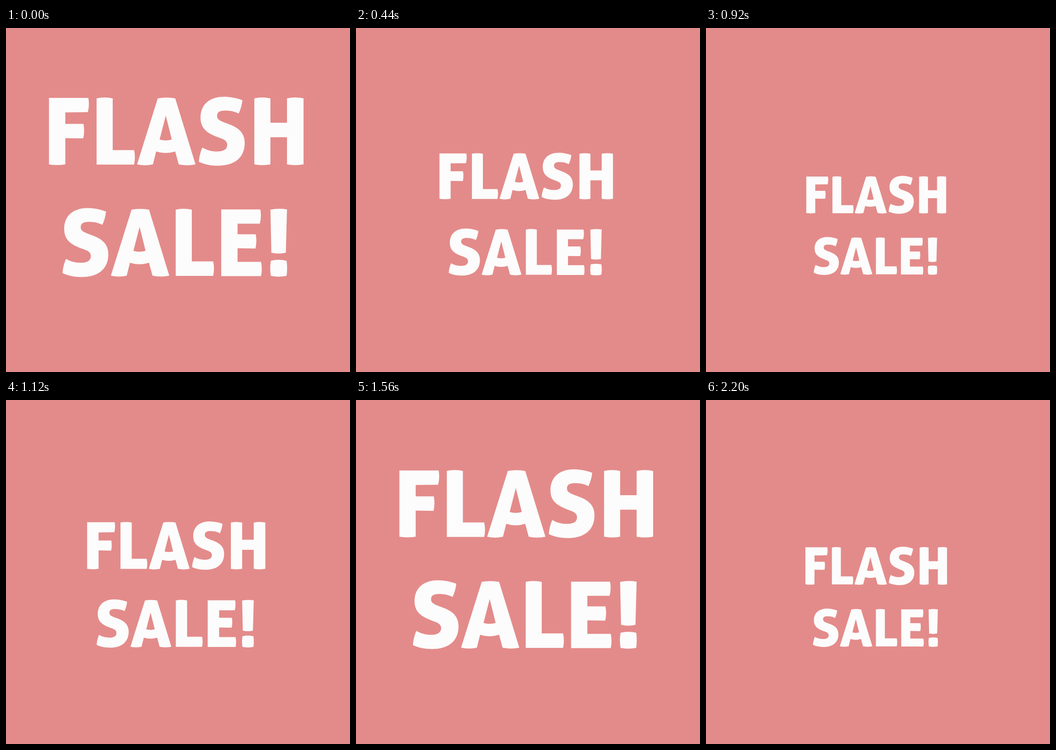
An HTML page that plays this animation: 748x748 px, repeating every 2.24 s.

```html
<!DOCTYPE html>
<html lang="en">
<head>
<meta charset="utf-8">
<title>Flash sale</title>
<style>
html, body { margin: 0; width: 100%; height: 100%; overflow: hidden; background: #e38b8a; }
svg { display: block; width: 100%; height: 100%; fill: #fcfcfc; fill-rule: evenodd; }
</style>
</head>
<body>
<svg viewBox="0 0 748 748" role="img" aria-label="FLASH SALE!">
  <defs>
    <path id="L" d="M197 153Q205 151 214 151T232 153V265.5H278.5Q282 281 278.5 297H197Z"/>
    <path id="A" d="M330 153Q349 149.5 368 153L412 296.5Q394 300.5 375.5 296.5L368 268.5Q347 275 326.5 268.5L319.500 296.500Q302 300.500 285 296.500ZM347.500 190.500L334 242.500Q347 246.500 360.500 242.500Z"/>
    <path id="S" d="M514 157C502 152.500 488 149.500 474 149.500C442 149.500 423 167 423 195C423 219 438 229 461 237.500C474 242 481 245 481 254C481 264 473 268.500 459 268.500C448 268.500 437 266 427 260C423 269 420 280 419.500 291C432 297 446 299.500 461 299.500C498 299.500 519 281 519 250C519 230 508 218 487 210C469 203 459 201 459 191C459 183 465 179.500 476 179.500C487 179.500 497 181.500 506 186C510 177 513 168 514 157Z"/>
  </defs>
  <g id="words">
    <path d="M93.500 152H179Q182 167 178 183L129 183.500V208.500H168.500Q171.500 224 168 240L129 239.500V296.500Q111 299.500 93.500 296.500Z"/>
    <use href="#L"/>
    <use href="#A"/>
    <use href="#S"/>
    <path d="M540 153Q557 149 575 153V206H611V153Q629 149 647 153V296.500Q629 300 611 296.500V237.500H575V296.500Q557 300 540 296.500Z"/>
    <use href="#S" x="-296.500" y="242"/>
    <use href="#A" x="-57" y="242"/>
    <use href="#L" x="172" y="242"/>
    <path d="M468 394.500H553Q556 410 552 425.500H503.500V448.500H543Q546 464 542.500 479.500L503.500 479V508.500H554.500Q558 524 554.500 539.500H468Z"/>
    <path d="M575 395Q593 391.500 611 394.500L608.500 488.500Q593 492.500 577 488.500ZM576 506Q593 502 610 506Q612.500 522 610 539Q592 542.500 576 539Q573 522 576 506Z"/>
  </g>
</svg>
<script>
const LOOP = 2240, STEP = 40;
// [time in ms, scale]; the size falls and rises linearly between turns
const keys = [
  [0, 1], [240, .8285], [640, .5345], [770, .441], [920, .5495], [1120, .7],
  [1280, .813], [1555, 1], [1680, .918], [1840, .8025], [2240, .529]
];
const words = document.getElementById('words');

function scaleAt(t) {
  const i = keys.findIndex(k => k[0] > t);
  const [t0, s0] = keys[i - 1], [t1, s1] = keys[i];
  return s0 + (s1 - s0) * (t - t0) / (t1 - t0);
}

function draw() {
  const t = Math.floor(performance.now() % LOOP / STEP) * STEP;
  words.setAttribute('transform', `translate(370 531.5) scale(${scaleAt(t)}) translate(-370 -531.5)`);
  requestAnimationFrame(draw);
}
draw();
</script>
</body>
</html>
```
